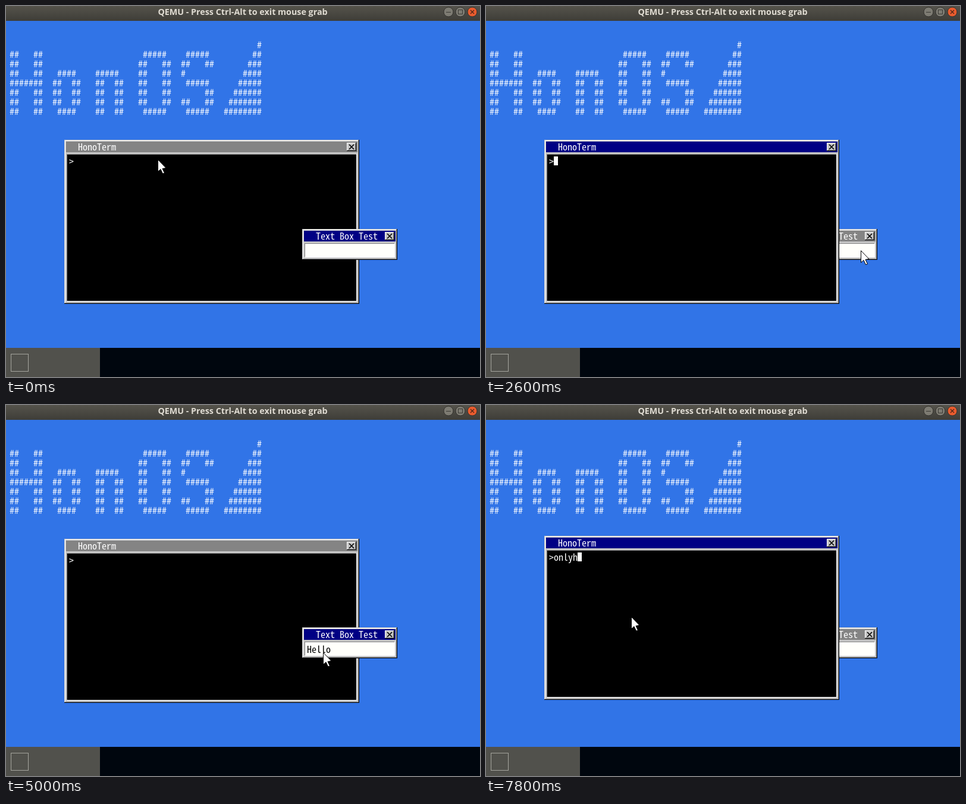
An HTML page with a canvas that plays this animation: 797 px wide and 624 px high, repeating every 8 s.

```html
<!DOCTYPE html>
<html>
<head>
<meta charset="utf-8">
<style>
html, body { margin: 0; width: 100%; height: 100%; overflow: hidden; background: #3174e7; }
canvas { display: block; }
</style>
</head>
<body>
<canvas id="stage" width="797" height="624"></canvas>
<script>
const g = document.getElementById('stage').getContext('2d');
const LOOP = 8000, STEP = 100;
const MONO = '300 16px "Noto Sans Mono CJK JP", "Noto Sans CJK JP", "Noto Sans Mono", monospace';
const GRAY = '#c6c6c6', SHADE = '#848484', NAVY = '#000084', WHITE = '#fffffb', BLACK = '#000';

// Banner rows as [column, length] runs of '#'
const H = [[0, 2], [5, 2]], O = [[9, 2], [13, 2]], N = [[18, 2], [22, 2]], BIG = [[27, 2], [32, 2]];
const BANNER = [
  [],
  [...H, [28, 5], [37, 5]],
  [...H, ...BIG, [36, 2], [41, 2]],
  [...H, [10, 4], [18, 5], ...BIG, [36, 1]],
  [[0, 7], ...O, ...N, ...BIG, [37, 5]],
  [...H, ...O, ...N, ...BIG, [41, 2]],
  [...H, ...O, ...N, ...BIG, [36, 2], [41, 2]],
  [...H, [10, 4], ...N, [28, 5], [37, 5]]
];

// Pointer path: time, x, y
const PATH = [
  [0, 255, 258], [100, 140, 94], [600, 140, 94], [700, 110, 120], [900, 110, 120],
  [1000, 82, 138], [1100, 74, 165], [1600, 317, 290], [1800, 330, 296], [2300, 649, 392],
  [2600, 630, 411], [2700, 630, 410], [3000, 630, 410], [3100, 639, 414], [4900, 639, 414],
  [5000, 533, 416], [5200, 300, 234], [5300, 298, 235], [5400, 290, 229], [5600, 244, 356]
];
const BLINK_ON = [100, 1100, 2100, 3100, 4200, 5100, 6100, 7100];
const BLINK_OFF = [0, 700, 1700, 2700, 3700, 4600, 5600, 6600, 7700];
const HELLO = { text: 'Hello', times: [3800, 3900, 4200, 4300, 4500] };
const ONLY = { text: 'onlyh', times: [6500, 6600, 6900, 7300, 7800] };

const last = (times, t) => Math.max(-1, ...times.filter(k => k <= t));

function box(x, y, w, h, color) {
  g.fillStyle = color;
  g.fillRect(x, y, w, h);
}

function print(text, x, y, color) {
  g.font = MONO;
  g.fillStyle = color;
  [...text].forEach((c, i) => g.fillText(c, x + i * 8, y));
}

function line(color, width, ...points) {
  g.strokeStyle = color;
  g.lineWidth = width;
  g.beginPath();
  for (let i = 0; i < points.length; i += 4) {
    g.moveTo(points[i], points[i + 1]);
    g.lineTo(points[i + 2], points[i + 3]);
  }
  g.stroke();
}

function pointer(t) {
  const i = PATH.findLastIndex(p => p[0] <= t);
  const a = PATH[i], b = PATH[i + 1] || a;
  const k = b === a ? 0 : (t - a[0]) / (b[0] - a[0]);
  return [a[1] + (b[1] - a[1]) * k, a[2] + (b[2] - a[2]) * k].map(Math.round);
}

function drawPointer([x, y]) {
  g.save();
  g.translate(x + .5, y + .5);
  g.beginPath();
  [[0, 0], [0, 20], [4.5, 16], [8, 23.5], [11, 22.5], [7.5, 15], [13.5, 14]]
    .forEach(p => g.lineTo(...p));
  g.closePath();
  g.fillStyle = '#fff';
  g.fill();
  g.strokeStyle = BLACK;
  g.lineWidth = 1;
  g.stroke();
  g.restore();
}

function drawWindow(x, y, w, h, title, focused, fill) {
  box(x, y, w, h, BLACK);
  box(x, y, w - 1, h - 1, GRAY);
  box(x + 1, y + 1, w - 2, h - 2, SHADE);
  box(x + 1, y + 1, w - 3, h - 3, '#fff');
  box(x + 2, y + 2, w - 4, h - 4, GRAY);
  box(x + 3, y + 3, w - 6, 18, focused ? NAVY : SHADE);
  print(title, x + 23, y + 18, '#fff');

  const bx = x + w - 21, by = y + 5;
  box(bx, by, 16, 14, BLACK);
  box(bx, by, 15, 13, '#fff');
  box(bx + 1, by + 1, 14, 12, SHADE);
  box(bx + 1, by + 1, 13, 11, GRAY);
  line(BLACK, 1.7, bx + 4, by + 3, bx + 12, by + 11, bx + 12, by + 3, bx + 4, by + 11);

  box(x + 4, y + 24, w - 8, h - 28, '#fff');
  box(x + 4, y + 24, w - 9, h - 29, SHADE);
  box(x + 5, y + 25, w - 10, h - 30, fill);
}

// Typed text with a caret; a key press shows the caret until the next blink
function drawInput({ text, times }, t, x, caretY, baseline, color) {
  const count = times.filter(k => k <= t).length;
  const off = last(BLINK_OFF, t);
  print(text.slice(0, count), x, baseline, color);
  if (last(BLINK_ON, t) > off || last(times, t) > off) box(x + count * 8, caretY, 7, 15, color);
}

function drawTerminal(t, focused) {
  const y = t < 5300 ? 225 : t < 5400 ? 226 : 220;
  drawWindow(98, y, 496, 276, 'HonoTerm', focused, BLACK);
  print('>', 106, y + 42, '#fff');
  drawInput(ONLY, t, 114, y + 28, y + 42, '#fff');
}

function drawTextBox(t, focused) {
  const y = t < 2800 ? 375 : 374;
  drawWindow(498, y, 160, 52, 'Text Box Test', focused, WHITE);
  drawInput(HELLO, t, 506, y + 29, y + 43, BLACK);
}

function drawFrame() {
  const bar = g.createLinearGradient(0, 0, 0, 25);
  bar.addColorStop(0, '#55534b');
  bar.addColorStop(1, '#3e3d38');
  box(0, 0, 797, 25, bar);
  g.font = 'bold 14.3px "Open Sans", "Noto Sans", sans-serif';
  g.fillStyle = '#dfdbd2';
  g.textAlign = 'center';
  g.fillText('QEMU - Press Ctrl-Alt to exit mouse grab', 398, 15);
  g.textAlign = 'left';
  [[744, '#7d7b72'], [764, '#7d7b72'], [784, '#ea5c2e']].forEach(([x, color]) => {
    g.beginPath();
    g.arc(x, 10, 8, 0, 7);
    g.fillStyle = color;
    g.fill();
    g.strokeStyle = '#33322e';
    g.lineWidth = 1;
    g.stroke();
  });
  line('#3b3a35', 1, 740, 10.5, 748, 10.5);
  g.strokeRect(760.5, 6.5, 7, 7);
  line('#4a2417', 1.2, 781, 7, 787, 13, 787, 7, 781, 13);
}

function drawDesktop() {
  box(0, 25, 797, 550, '#3174e7');
  BANNER.forEach((runs, row) => {
    for (const [col, n] of [...runs, [52 - row, row + 1]])
      print('#'.repeat(n), 6 + col * 8, 71 + row * 16, '#fff');
  });
  box(0, 575, 797, 49, '#00060e');
  box(0, 575, 158, 49, '#51514c');
  g.strokeStyle = '#a5a59e';
  g.lineWidth = 1;
  g.strokeRect(8.5, 585.5, 29, 29);
}

function draw(now) {
  const t = Math.floor(now % LOOP / STEP) * STEP;
  const termFront = t >= 1700 && t < 2700 || t >= 5200;
  drawDesktop();
  drawFrame();
  if (termFront) {
    drawTextBox(t, false);
    drawTerminal(t, true);
  } else {
    drawTerminal(t, false);
    drawTextBox(t, true);
  }
  drawPointer(pointer(t));
  requestAnimationFrame(draw);
}
requestAnimationFrame(draw);
</script>
</body>
</html>
```
